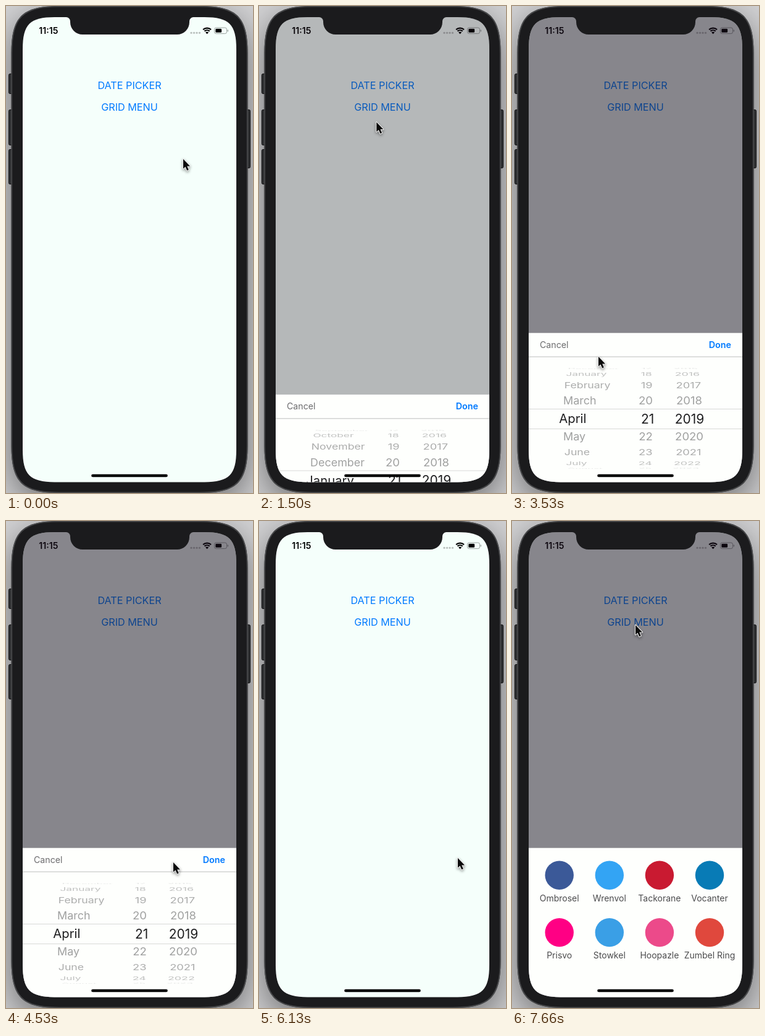
Write an HTML page with a canvas that moves like this. It is 400x786 px and loops after 8 s.

```html
<!DOCTYPE html>
<html>
<head>
<meta charset="utf-8">
<style>
  html, body { margin: 0; height: 100%; overflow: hidden; background: #d4d4d6; }
  canvas { display: block; }
</style>
</head>
<body>
<canvas id="stage" width="400" height="786"></canvas>
<script>
const ctx = document.getElementById('stage').getContext('2d');
const LOOP = 8000;
const BLUE = '#007aff', INK = '#1e1e20', PAPER = '#fefffd', BEZEL = '#1b1b1d';
const MONTHS = ['January', 'February', 'March', 'April', 'May', 'June', 'July',
  'August', 'September', 'October', 'November', 'December'];

const clamp = v => Math.min(1, Math.max(0, v));
const ramp = (t, from, to) => { const x = clamp((t - from) / (to - from)); return x * x * (3 - 2 * x); };
const within = (t, from, to) => t >= from && t < to;

// Pointer stops: time, x, y
const DRAG_START = 2350;
const STOPS = [[30, 287, 247], [760, 199, 127], [1300, 199, 127], [2260, 122, 662], [DRAG_START, 122, 662],
  [3300, 140, 566], [4160, 140, 566], [4730, 322, 545], [6130, 322, 544], [7050, 200, 168]];
const TOUCHES = [[1000, 1130], [2330, 3450], [5080, 5200], [7050, 7150]];

function pointer(t) {
  let [, x, y] = STOPS[0];
  for (let i = 1; i < STOPS.length; i++) {
    const [start] = STOPS[i - 1], [end, endX, endY] = STOPS[i];
    const k = ramp(t, start, end);
    x += (endX - x) * k;
    y += (endY - y) * k;
  }
  return [x, y];
}

function paint(fill, stroke, line = 1) {
  if (fill) { ctx.fillStyle = fill; ctx.fill(); }
  if (stroke) { ctx.strokeStyle = stroke; ctx.lineWidth = line; ctx.stroke(); }
}

function box(x, y, w, h, r, fill, stroke, line) {
  ctx.beginPath();
  ctx.roundRect(x, y, w, h, r);
  paint(fill, stroke, line);
}

// Rectangle with continuous-curvature corners
function smoothBox(x, y, w, h, r, fill, stroke, line) {
  const reach = r * 1.4, pull = reach * 0.225;
  const right = x + w, bottom = y + h;
  ctx.beginPath();
  ctx.moveTo(x + reach, y);
  ctx.lineTo(right - reach, y);
  ctx.bezierCurveTo(right - pull, y, right, y + pull, right, y + reach);
  ctx.lineTo(right, bottom - reach);
  ctx.bezierCurveTo(right, bottom - pull, right - pull, bottom, right - reach, bottom);
  ctx.lineTo(x + reach, bottom);
  ctx.bezierCurveTo(x + pull, bottom, x, bottom - pull, x, bottom - reach);
  ctx.lineTo(x, y + reach);
  ctx.bezierCurveTo(x, y + pull, x + pull, y, x + reach, y);
  paint(fill, stroke, line);
}

function disc(x, y, r, fill) {
  ctx.beginPath();
  ctx.arc(x, y, r, 0, 7);
  paint(fill);
}

// y is the middle of the capital letters
function text(string, x, y, size, color, align = 'center', weight = 400) {
  ctx.font = `${weight} ${size}px Inter, "Liberation Sans", sans-serif`;
  ctx.textAlign = align;
  ctx.fillStyle = color;
  ctx.fillText(string, x, y + size * 0.36);
}

function faded(alpha, draw) {
  ctx.save();
  ctx.globalAlpha *= alpha;
  draw();
  ctx.restore();
}

function drawPhone() {
  ctx.fillStyle = '#d4d4d6';
  ctx.fillRect(0, 0, 400, 786);
  ctx.save();
  ctx.shadowColor = 'rgba(0,0,0,.5)';
  ctx.shadowBlur = 60;
  ctx.shadowOffsetY = 18;
  smoothBox(8.5, 0, 383, 786, 55, BEZEL);
  ctx.restore();
  for (const [x, y, h] of [[4, 109, 33], [4, 167, 58], [4, 231, 57], [388, 167, 95]])
    box(x + 0.5, y + 0.5, 7, h - 1, 2, '#303133', '#111113');
  smoothBox(9.3, 0.8, 381.4, 784.4, 54.5, BEZEL, '#4a4b4d', 1.6);
}

function drawStatus() {
  text('11:15', 53.2, 40, 14.2, '#000', 'left', 600);
  for (let i = 0; i < 4; i++) disc(300 + i * 4.5, 43.3, 1.6, '#b9c0bd');

  ctx.strokeStyle = ctx.fillStyle = '#000';
  ctx.lineWidth = 2.2;
  for (const r of [6, 9.4]) {
    ctx.beginPath();
    ctx.arc(325.6, 45, r, -Math.PI * 0.74, -Math.PI * 0.26);
    ctx.stroke();
  }
  ctx.beginPath();
  ctx.moveTo(325.6, 45.2);
  ctx.arc(325.6, 45, 3.4, -Math.PI * 0.76, -Math.PI * 0.24);
  ctx.fill();

  box(337.5, 35, 20, 9.6, 2.8, null, '#98a09d');
  box(339.3, 36.8, 9.8, 6, 1.3, '#000');
  box(358.7, 38.2, 1.3, 3.2, 0.6, '#98a09d');
}

function drawWheel(column, position, selected) {
  const size = column.size * (selected ? 1.125 : 1);
  const middle = Math.round(position);
  for (let row = middle - 4; row <= middle + 4; row++) {
    const angle = (row - position) * 0.3663;
    const depth = Math.cos(angle);
    if (depth <= 0.02) continue;
    const scale = 1 - 0.077 * (1 - depth);
    ctx.save();
    ctx.translate(200, 666 + 81 * Math.sin(angle));
    ctx.scale(scale, scale * depth);
    if (!selected) ctx.globalAlpha = 0.44 * depth ** 0.6;
    text(column.label(row), (selected ? column.bigX : column.x) - 200, 0, size, INK, column.align);
    ctx.restore();
  }
}

const COLUMNS = [
  { x: 82.5, bigX: 76.3, size: 18, align: 'left', label: i => MONTHS[(i + 12) % 12] },
  { x: 228, bigX: 230.3, size: 18.6, align: 'right', label: i => 21 + i },
  { x: 287.5, bigX: 287.5, size: 18.6, align: 'center', label: i => 2019 + i }
];

function drawDatePicker(t) {
  text('Cancel', 45, 546.8, 14.2, '#6c6c6e', 'left');
  const doneAlpha = t < 5080 ? 1 : 0.2 + 0.8 * ramp(t, 5200, 5430);
  faded(doneAlpha, () => text('Done', 355, 546.8, 14.3, BLUE, 'right', 600));
  ctx.fillStyle = '#d3d4d3';
  ctx.fillRect(27, 565.5, 346, 1.5);

  // The month wheel follows the finger once it has moved a little, then stays
  const fingerY = pointer(Math.min(3530, Math.max(DRAG_START, t - 50)))[1];
  const month = Math.max(0, (655 - fingerY) / 29.67);
  for (const selected of [false, true]) {
    ctx.save();
    ctx.beginPath();
    if (selected) ctx.rect(27, 650, 346, 32);
    else { ctx.rect(27, 584, 346, 66); ctx.rect(27, 682, 346, 65); }
    ctx.clip();
    COLUMNS.forEach((column, i) => drawWheel(column, i ? 0 : month, selected));
    ctx.restore();
  }
  ctx.fillStyle = '#d8d9d8';
  ctx.fillRect(27, 650, 346, 1);
  ctx.fillRect(27, 682, 346, 1);
}

const GRID = [['Ombrosel', '#3b5998'], ['Wrenvol', '#33a4f4'], ['Tackorane', '#c91a31'], ['Vocanter', '#087bb6'],
  ['Prisvo', '#ff0084'], ['Stowkel', '#3a9fe6'], ['Hoopazle', '#ec4a8a'], ['Zumbel Ring', '#e0483d']];

function drawGridMenu() {
  GRID.forEach(([name, color], i) => {
    const x = 76.7 + (i % 4) * 81.1, y = 571.7 + (i >> 2) * 92.4;
    disc(x, y, 23.2, color);
    text(name, x, y + 36.8, 14, '#4b4b4d');
  });
}

function drawSheet(open, draw) {
  if (open <= 0) return;
  ctx.save();
  ctx.translate(0, 241 * (1 - open));
  ctx.fillStyle = PAPER;
  ctx.fillRect(27, 527.7, 346, 242);
  draw();
  ctx.restore();
}

function drawNotch() {
  ctx.fillStyle = BEZEL;
  ctx.fill(new Path2D('M97.5 17V18A6.5 6.5 0 0 1 104 24.5V26A20 20 0 0 0 124 46H277A20 20 0 0 0 297 26V24.5A6.5 6.5 0 0 1 303.5 18V17Z'));
}

const ARROW = new Path2D('M0 0V15.5L3.5 12.5L6.2 18.5L8.8 17.3L6.2 11.5H11Z');

function drawPointer(t) {
  const [x, y] = pointer(t);
  if (TOUCHES.some(([from, to]) => within(t, from, to))) {
    const [touchX, touchY] = pointer(t - 50);
    box(touchX - 17, touchY - 17, 38, 38, 19, 'rgba(150,150,150,.45)', 'rgba(120,120,120,.45)');
  }
  ctx.save();
  ctx.translate(x, y);
  ctx.shadowColor = 'rgba(0,0,0,.45)';
  ctx.shadowBlur = 4;
  ctx.shadowOffsetY = 2;
  ctx.strokeStyle = '#eee';
  ctx.lineWidth = 2.2;
  ctx.lineJoin = 'round';
  ctx.stroke(ARROW);
  ctx.shadowColor = 'transparent';
  ctx.fillStyle = '#0a0a0a';
  ctx.fill(ARROW);
  ctx.restore();
}

function render(t) {
  const pickerOpen = ramp(t, 1300, 1660) - ramp(t, 5220, 5530);
  const gridOpen = ramp(t, 7300, 7660);
  const dim = ramp(t, 1300, 1660) - ramp(t, 5290, 5530) + gridOpen;

  drawPhone();
  ctx.save();
  smoothBox(27, 18, 346, 750.4, 37, '#f5fffb');
  ctx.clip();
  drawStatus();
  faded(within(t, 1030, 1320) ? 0.2 : 1, () => text('DATE PICKER', 200, 128.5, 16.2, BLUE));
  faded(within(t, 7050, 7320) ? 0.2 : 1, () => text('GRID MENU', 200, 163.3, 16.2, BLUE));
  ctx.fillStyle = `rgba(27,15,30,${dim * 0.5})`;
  ctx.fillRect(27, 18, 346, 751);
  drawSheet(pickerOpen, () => drawDatePicker(t));
  drawSheet(gridOpen, drawGridMenu);
  ctx.restore();
  drawNotch();
  box(138.2, 755.7, 123.6, 4.6, 2.3, '#000');
  drawPointer(t);
}

function tick() {
  render(performance.now() % LOOP);
  requestAnimationFrame(tick);
}
tick();
</script>
</body>
</html>
```
